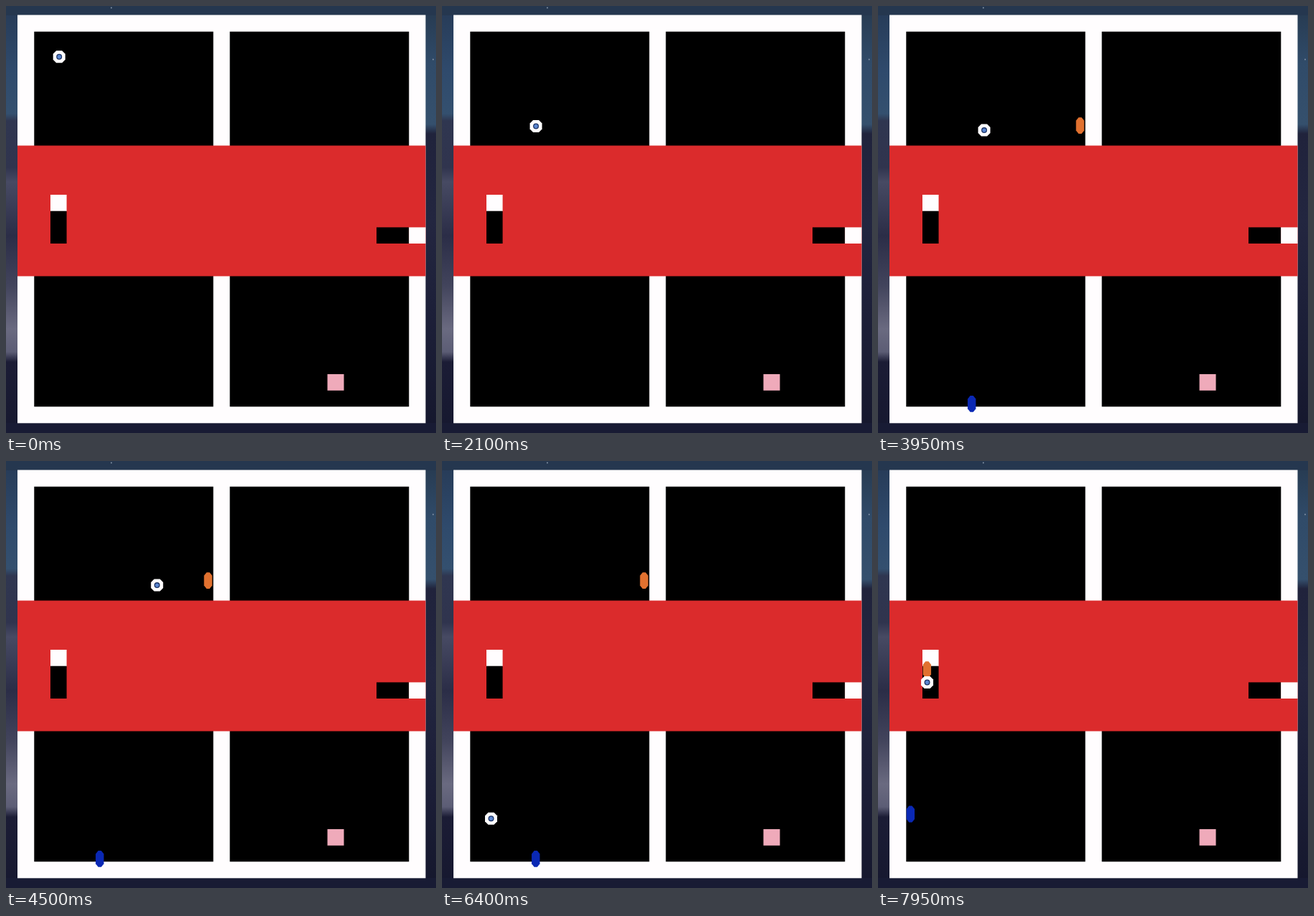
These frames come from a looping animation (600 by 595 pixels, 8000 ms). An HTML page with a canvas:

```html
<!DOCTYPE html>
<html>
<head>
<meta charset="utf-8">
<style>
  html, body { margin: 0; width: 100%; height: 100%; overflow: hidden; background: #1a1c34; }
  canvas { display: block; }
</style>
</head>
<body>
<canvas id="stage" width="600" height="595"></canvas>
<script>
const ctx = document.getElementById('stage').getContext('2d');
const LOOP = 8000, TICK = 50, STEP = 5.69;
const ORANGE = '#e1712f', BLUE = '#0a28b4', RED = '#db2b2c', WHITE = '#fffdfe', PINK = '#efaaba';

// Ball: runs of steps {at, steps, dx, dy}, and jumps {at, x, y}
const moves = [
  { at: 0, x: 74.2, y: 70.7 },
  { at: 250, steps: 10, dx: 1, dy: 0 },
  { at: 850, steps: 1, dx: 0, dy: 1 },
  { at: 1250, steps: 8, dx: 0, dy: 1 },
  { at: 1750, steps: 9, dx: 0, dy: 1 },
  { at: 3500, steps: 1, dx: 1, dy: 0 },
  { at: 3900, steps: 23, dx: 1, dy: 0 },
  { at: 5050, x: 131.1, y: 538 },
  { at: 5350, steps: 7, dx: 0, dy: -1 },
  { at: 5850, steps: 11, dx: -1, dy: 0 },
  { at: 7550, steps: 1, dx: -1, dy: 0 },
  { at: 7950, x: 68.6, y: 308.5 }
];

const portals = [
  { from: 2650, to: 6700, x: 282, y: 166.7, color: ORANGE },
  { from: 3350, to: 7100, x: 130.8, y: 554.3, color: BLUE },
  { from: 6700, to: LOOP, x: 68.4, y: 290.6, color: ORANGE },
  { from: 7100, to: LOOP, x: 45.4, y: 492, color: BLUE }
];

function rect(color, x, y, right, bottom) {
  ctx.fillStyle = color;
  ctx.fillRect(x, y, right - x, bottom - y);
}

// Rectangle with its corners cut off, given by half sizes
function octagon(color, x, y, w, h, cutX, cutY) {
  const a = w - cutX, b = h - cutY;
  ctx.fillStyle = color;
  ctx.beginPath();
  for (const [px, py] of [[-a, -h], [a, -h], [w, -b], [w, b], [a, h], [-a, h], [-w, b], [-w, -b]])
    ctx.lineTo(x + px, y + py);
  ctx.fill();
}

function disc(color, x, y, r) {
  ctx.fillStyle = color;
  ctx.beginPath();
  ctx.arc(x, y, r, 0, 7);
  ctx.fill();
}

function gradient(stops) {
  const g = ctx.createLinearGradient(0, 0, 0, 595);
  for (const [y, color] of stops) g.addColorStop(y / 595, color);
  return g;
}

const leftSky = gradient([[0, '#263a56'], [90, '#2f4a6c'], [150, '#34506f'], [160, '#2f3650'],
  [225, '#30344e'], [245, '#474a63'], [320, '#2b2d47'], [390, '#42445c'], [450, '#6a6a80'],
  [482, '#5c5d75'], [496, '#1b1c35'], [595, '#16182f']]);
const rightSky = gradient([[0, '#26394f'], [80, '#304b69'], [165, '#35506d'], [178, '#20233c'],
  [300, '#232640'], [420, '#1d2039'], [595, '#15172d']]);

function drawBoard() {
  rect(leftSky, 0, 0, 300, 595);
  rect(rightSky, 300, 0, 600, 595);
  rect('#25374f', 0, 0, 600, 13);
  rect('#181b34', 0, 581, 600, 595);
  disc('#8494a8', 147, 2.5, 1);
  disc('#8494a8', 596, 74.5, 1);

  rect(WHITE, 16, 12.5, 585.5, 581.3);
  for (const x of [39.3, 312.3]) {
    rect('#000', x, 35.7, x + 250, 195);
    rect('#000', x, 376, x + 250, 558.3);
  }
  rect(RED, 16, 194.5, 585.5, 376.5);
  rect(WHITE, 62, 263, 84.6, 286);
  rect('#000', 62, 285.7, 84.6, 331);
  rect('#000', 517, 308.4, 562.2, 331);
  rect(WHITE, 562.2, 308.4, 585.5, 331);
  rect(PINK, 448.5, 513, 471.5, 535.8);
}

function ballAt(t) {
  let x, y;
  for (const m of moves) {
    if (t < m.at) break;
    if (m.steps) {
      const n = Math.min(m.steps, (t - m.at) / TICK + 1);
      x += n * m.dx * STEP;
      y += n * m.dy * STEP;
    } else ({ x, y } = m);
  }
  return { x, y };
}

function draw(now) {
  const t = Math.floor(now % LOOP / TICK) * TICK;
  drawBoard();
  for (const p of portals)
    if (t >= p.from && t < p.to) octagon(p.color, p.x, p.y, 5.7, 11.4, 3.6, 4.5);
  const { x, y } = ballAt(t);
  octagon(WHITE, x, y, 8.5, 8.5, 4.5, 4.5);
  disc('#1c3263', x, y, 4);
  disc('#5a86d0', x, y, 2.7);
  requestAnimationFrame(draw);
}
requestAnimationFrame(draw);
</script>
</body>
</html>
```
